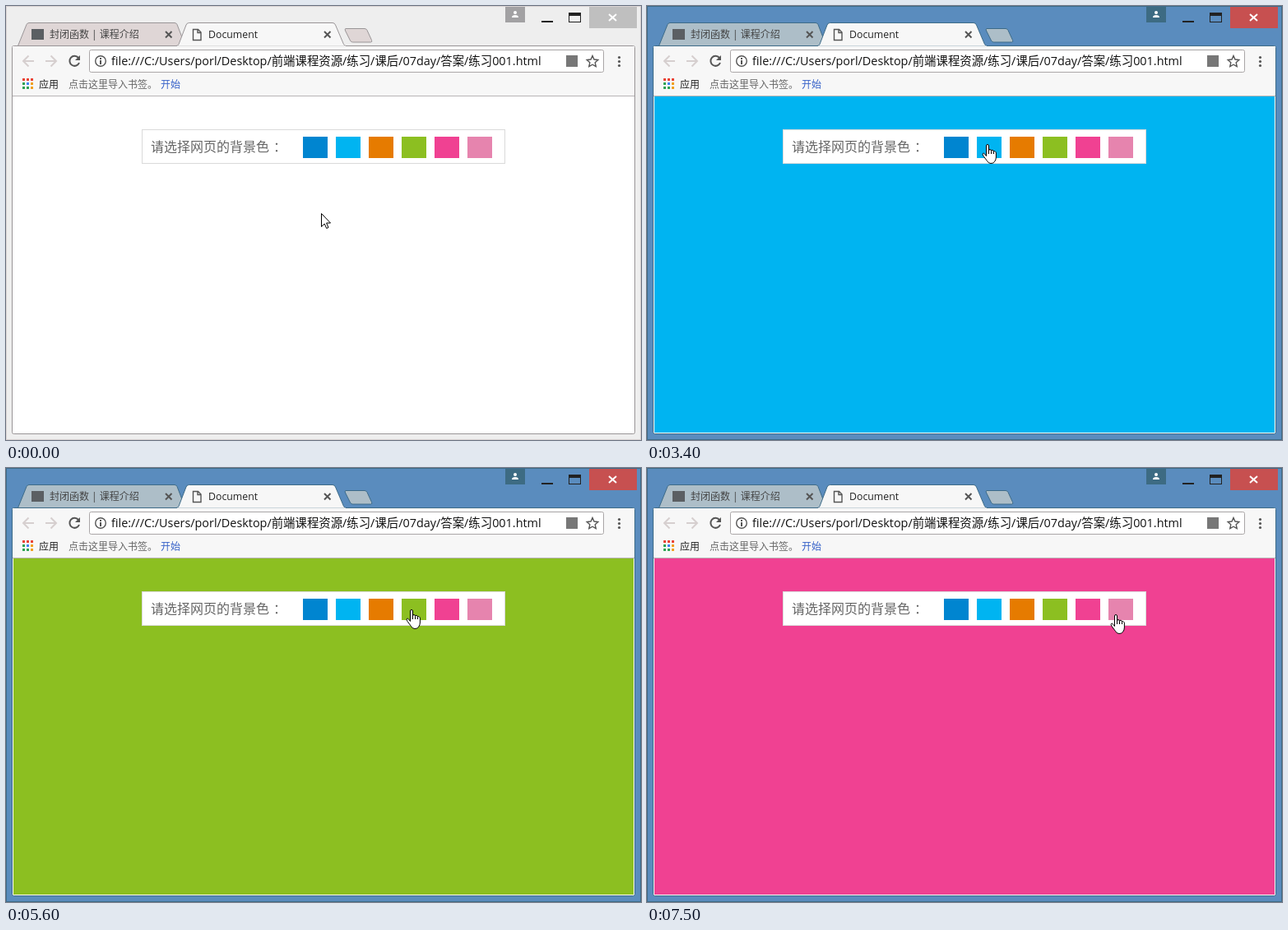
These frames come from a looping animation (772 px wide and 528 px high, 8000 ms). An HTML page:

```html
<!DOCTYPE html>
<html lang="zh-CN">
<head>
<meta charset="utf-8">
<title>Document</title>
<style>
html, body { margin: 0; width: 100%; height: 100%; overflow: hidden; }
svg {
  display: block; width: 772px; height: 528px;
  font: 12px "Open Sans", "Noto Sans CJK SC", "Noto Sans CJK", sans-serif;
  --frame: #eee; --edge: #d8d2d2; --line: #999597; --tab: #dfd6d6; --badge: #a2a1a3; --close: #bfbfbf;
}
svg.active {
  --frame: #5a8cbe; --edge: #3d6b88; --line: #3d6b88; --tab: #adbec8; --badge: #3d6b83; --close: #c75050;
}
.line { stroke: var(--line); }
.tab { fill: var(--tab); }
.icon { fill: none; stroke: #555; stroke-width: 2; }
.faint { stroke: #d6cfcf; }
.thin { stroke-width: 1.4; }
.cursor { fill: #fff; stroke: #000; stroke-linejoin: round; }
</style>
</head>
<body>
<svg id="stage" viewBox="0 0 772 528">
  <rect x=".5" y=".5" width="771" height="527" style="fill:var(--frame);stroke:var(--edge)"/>

  <!-- window buttons -->
  <path d="M607 1h24v19h-24z" style="fill:var(--badge)"/>
  <g fill="#fff"><circle cx="619" cy="8" r="2"/><path d="M615 14q0-3 4-3t4 3z"/></g>
  <path d="M651 18h14v2h-14zM684 8h15v12h-15zm1 4v7h13v-7z" fill="#222" fill-rule="evenodd"/>
  <path d="M709 1h58v26h-58z" style="fill:var(--close)"/>
  <path d="M733 10l9 8m0-8l-9 8" stroke="#fff" stroke-width="2"/>

  <!-- tabs and page -->
  <path class="tab line" d="M14.5 48.500L25 22.500q1-2 3-2H205q2 0 3 2L218 48.500z"/>
  <path class="tab line" d="M413 27.500h23q2 0 3 2l5.500 12q1 2.500-1 2.500h-22q-2 0-3-2l-6-12q-1-2.500.500-2.500z"/>
  <rect class="line" x="7.5" y="48.500" width="757" height="472" rx="2" fill="#fff"/>
  <path d="M8 49h756v60H8z" fill="#f7f7f7"/>
  <path class="line" d="M207 48.500q2 0 3-2L219 23q1-2.500 3.500-2.500H397q2.500 0 3.500 2.500l10 23.500q1 2 3 2" fill="#f7f7f7"/>
  <path d="M208 49h205" stroke="#f7f7f7"/>
  <path d="M8 109.500h756" stroke="#b8b5b6"/>
  <rect x="31" y="28" width="15" height="13" fill="#5b5f63"/>
  <path class="icon thin" d="M227.500 28.500h6l3.500 3.500v9.500h-9.500zM233 28.500v4h4"/>
  <path class="icon" d="M194 31l7.500 7.500m0-7.500l-7.500 7.500M387 31l7.500 7.500m0-7.500l-7.500 7.500"/>
  <text x="53" y="39" fill="#444">封闭函数 | 课程介绍</text>
  <text x="246" y="39" font-size="12.3" fill="#222">Document</text>

  <!-- toolbar -->
  <path class="icon faint" d="M34 67H21m6.500-6.500L21 67l6.500 6.500M48 67h13m-6.500-6.500L61 67l-6.500 6.500"/>
  <path class="icon" d="M88 63a6 6 0 1 0 1 6"/>
  <path d="M90 60v6h-6z" fill="#555"/>
  <rect x="101.500" y="53.500" width="625" height="27" rx="2" fill="#fff" stroke="#aaa6a7"/>
  <circle class="icon thin" cx="115" cy="67" r="6.300"/>
  <path d="M114 63h2v2h-2zm0 3h2v5h-2z" fill="#555"/>
  <text x="128" y="72" font-size="14.400" fill="#111">file:///C:/Users/porl/Desktop/前端课程资源/练习/课后/07day/答案/练习001.html</text>
  <rect x="681" y="60" width="14" height="14" fill="#777"/>
  <path class="icon thin" d="M713 60.500l2 4.500 4.800.500-3.600 3.300 1 4.900-4.200-2.500-4.200 2.500 1-4.900-3.600-3.300 4.800-.500z"/>
  <g fill="#555"><circle cx="745.500" cy="62.500" r="1.600"/><circle cx="745.500" cy="67.500" r="1.600"/><circle cx="745.500" cy="72.500" r="1.600"/></g>
  <g id="apps"></g>
  <text x="40" y="100" fill="#222">应用</text>
  <text x="76" y="100" fill="#666">点击这里导入书签。</text>
  <text x="188" y="100" fill="#3560c8">开始</text>

  <!-- page content -->
  <path id="page" d="M9 110h754v409H9z"/>
  <rect x="165.500" y="150.500" width="441" height="41" fill="#fff" stroke="#dadada"/>
  <text x="176" y="177" font-size="16" fill="#666">请选择网页的背景色<tspan x="325">：</tspan></text>
  <g id="swatches"></g>

  <path id="arrow" class="cursor" d="M.5.5V16.500L4.200 13 6.700 18.500 9 17.500 6.600 12H11.500z"/>
  <g id="hand" class="cursor">
    <path d="M5.500 14.500V2Q5.500.500 7 .500T8.500 2V8Q8.500 6.500 10 6.500T11.500 8.500Q11.500 7 13 7.300T14.500 9.500Q15 8 16.200 8.800T17.400 11V16Q17.400 19 15.500 21.500 14 23.500 11 23.500 8 23.500 6.500 20.500L2 14.500Q.5 12 1.500 11.300T4 12.500z"/>
    <path d="M8.500 8v4m3-3.500V12m3-2.500V12" fill="none"/>
  </g>
</svg>
<script>
const byId = id => document.getElementById(id);
const stage = byId('stage'), page = byId('page'), arrow = byId('arrow'), hand = byId('hand');
const colors = ['#0085d0', '#00b4f1', '#e67b00', '#8cbf21', '#f04192', '#e684ae'];
const swatchX = i => 361 + 40 * i;
const rect = (x, y, w, h, fill) => `<rect x="${x}" y="${y}" width="${w}" height="${h}" fill="${fill}"/>`;

byId('swatches').innerHTML = colors.map((c, i) => rect(swatchX(i), 159, 30, 26, c)).join('');
const [red, green, blue, amber] = ['#ea4335', '#2fa254', '#4285f4', '#f0a020'];
byId('apps').innerHTML = [red, red, red, green, blue, amber, green, green, amber]
  .map((c, i) => rect(20 + i % 3 * 5, 88 + (i / 3 | 0) * 5, 3, 3, c)).join('');

// Pointer moves: start time, number of 100 ms steps, end point
const moves = [[1000, 6, 414, 168], [3800, 4, 457, 172], [4800, 3, 493, 172],
  [6000, 2, 540, 171], [7100, 2, 568, 178], [7500, 1, 570, 178]];
// Clicks: time, page colour
const clicks = [[3400, colors[1]], [4500, colors[2]], [5600, colors[3]], [6800, colors[4]]];

function pointerAt(t) {
  let x = 383, y = 252;
  for (const [start, steps, endX, endY] of moves) {
    if (t < start) break;
    const p = Math.min(1, (Math.floor((t - start) / 100) + 1) / steps);
    x += (endX - x) * p;
    y += (endY - y) * p;
  }
  return [Math.round(x), Math.round(y)];
}

function draw() {
  const t = performance.now() % 8000;
  const [x, y] = pointerAt(t);
  const over = y >= 159 && y < 185 && colors.some((c, i) => x >= swatchX(i) && x < swatchX(i) + 30);
  const click = clicks.filter(([time]) => t >= time).pop();
  stage.classList.toggle('active', t >= 3200);
  page.setAttribute('fill', click ? click[1] : '#fff');
  arrow.setAttribute('visibility', over ? 'hidden' : 'visible');
  hand.setAttribute('visibility', over ? 'visible' : 'hidden');
  arrow.setAttribute('transform', `translate(${x} ${y})`);
  hand.setAttribute('transform', `translate(${x - 7} ${y})`);
  requestAnimationFrame(draw);
}
draw();
</script>
</body>
</html>
```
